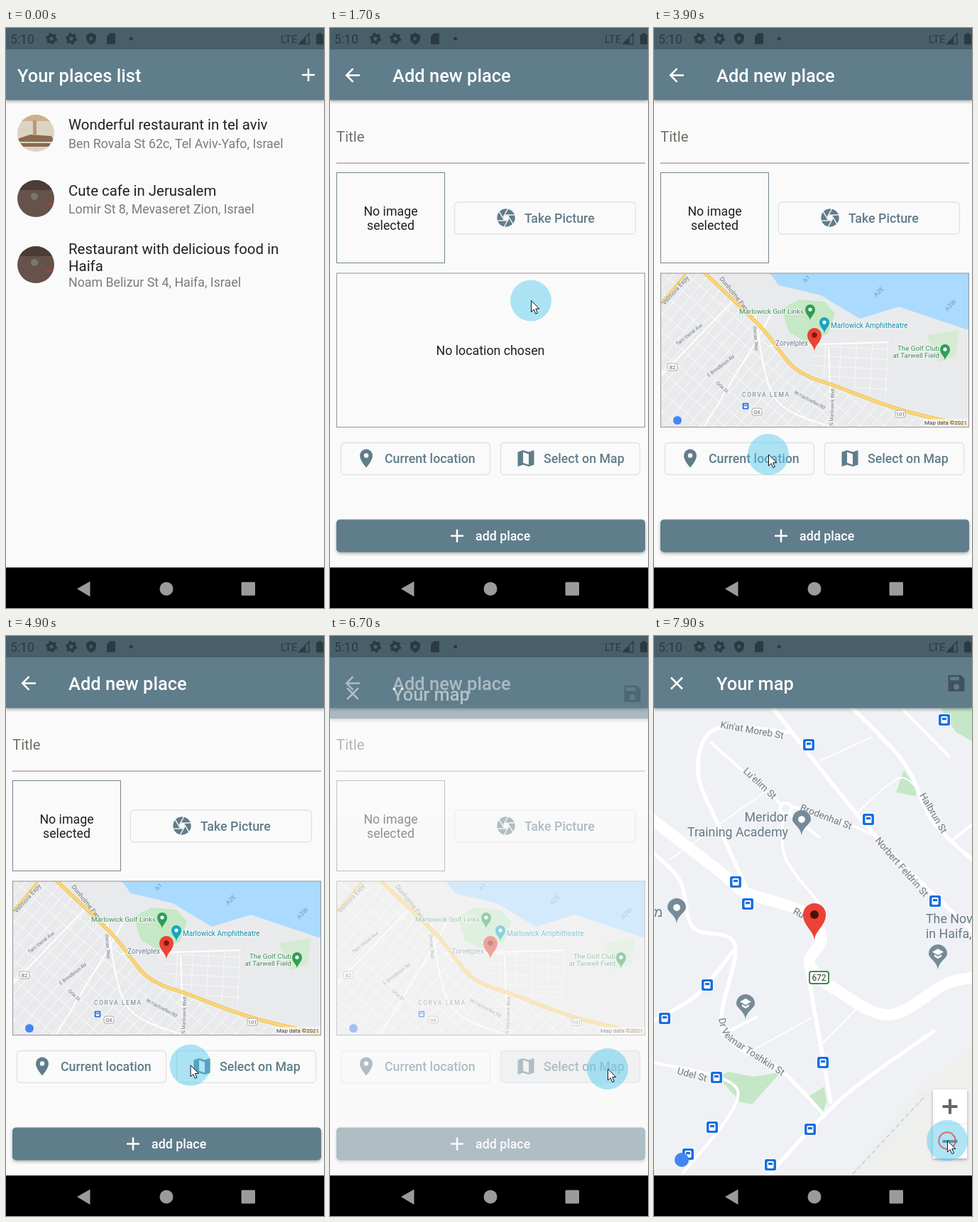
These frames come from a looping animation (448x816 px, 8000 ms). An HTML page:

```html
<!DOCTYPE html>
<html lang="en">
<head>
<meta charset="utf-8">
<title>Places app</title>
<style>
html, body { margin: 0; width: 100%; height: 100%; overflow: hidden; background: #000; }
svg { display: block; width: 448px; height: 816px; font-family: Roboto, "Noto Sans", sans-serif; }
.raised { filter: drop-shadow(0 2px 2px rgba(0,0,0,.3)); }
.road { fill: none; stroke-linecap: round; stroke-linejoin: round; }
.halo text { paint-order: stroke; stroke: #f2f4f7; stroke-width: 2.5px; stroke-linejoin: round; }
</style>
</head>
<body>
<svg id="stage" viewBox="0 0 448 816"></svg>
<script>
const SLATE = '#607d8b', PAPER = '#fafafa', DARK = '#2b3a42', INK = '#212121', GREY = '#74797d';
const BLUE = '#1a6fe0', RED = '#ea4335', STEEL = '#758b97', PAGE_H = 759;
const BAR = 25.46, HEAD = 20.4, BODY = 17.8;
const mid = 'text-anchor="middle"', end = 'text-anchor="end"', bold = 'font-weight="500"';

const text = (s, x, y, size, fill, more = '') =>
  `<text x="${x}" y="${y}" font-size="${size}" fill="${fill}" ${more}>${s}</text>`;
const tilted = (s, x, y, angle, size = 13.5, fill = GREY) =>
  text(s, x, y, size, fill, `transform="rotate(${angle} ${x} ${y})"`);
const rect = (x, y, w, h, fill, more = '') =>
  `<rect x="${x}" y="${y}" width="${w}" height="${h}" fill="${fill}" ${more}/>`;
const dot = (x, y, r, fill, more = '') => `<circle cx="${x}" cy="${y}" r="${r}" fill="${fill}" ${more}/>`;
const shape = (d, fill) => `<path d="${d}" fill="${fill}" fill-rule="evenodd"/>`;
const line = (d, color, width) => `<path d="${d}" fill="none" stroke="${color}" stroke-width="${width}"/>`;
const at = (x, y, body, k = 1) => `<g transform="translate(${x} ${y}) scale(${k})">${body}</g>`;
const frame = (x, y, w, h, color) => rect(x + .5, y + .5, w, h, 'none', `stroke="${color}"`);

// Icons are centred on 0,0
const plus = (r, color, w) => line(`M${-r} 0H${r}M0 ${-r}V${r}`, color, w);
const icons = {
  back: line('M10 0H-8M.5-9.3L-8.8 0 .5 9.3', '#fff', 2.5),
  close: line('M-8-8L8 8M8-8L-8 8', '#fff', 2.5),
  save: shape('M-11.5-11.5H6.500L11.5-6.500V11.5H-11.5z', '#40535d') + rect(-9, -9, 13, 5, SLATE) + dot(0, 5, 3.9, SLATE),
  place: shape('M-9-4a9 9 0 0 1 18 0C9 3 0 13 0 13S-9 3-9-4z', SLATE) + dot(0, -4, 3.2, PAPER),
  map: shape('M-11.5-9L-4-11.5 4-9 11.5-11.5V9L4 11.5-4 9-11.5 11.5zM4 9L-4 6.300V-9L4-6z', SLATE),
  camera: dot(0, 0, 12.7, SLATE) + dot(0, 0, 3.7, PAPER) +
    [0, 1, 2, 3, 4, 5].map(i => `<g transform="rotate(${i * 60})">${line('M-3.7-1.200L2.800-13', PAPER, 1.4)}</g>`).join(''),
  cap: shape('M0-7L-8-2.500 0 2 8-2.500zM-5 1V4L0 7 5 4V1L0 4z', '#fff'),
  gear: dot(0, 0, 4.6, 'none', `stroke="${DARK}" stroke-width="3.6"`) +
    dot(0, 0, 6.9, 'none', `stroke="${DARK}" stroke-width="2.6" pathLength="12" stroke-dasharray="1"`),
  shield: shape('M0-8.500L7-5V0Q6 6 0 8.500-6 6-7 0V-5zM-2-3V3L3 0z', DARK),
  card: shape('M-1.500-7.700H6V7.700H-6V-3z', DARK),
  bus: rect(-9, -9, 18, 18, '#fff', 'rx="3"') + rect(-8, -8, 16, 16, BLUE, 'rx="2.5"') +
    rect(-4.5, -5, 9, 10, '#fff', 'rx="1.5"') + rect(-3, -3, 6, 3.2, BLUE)
};

const pin = (x, y, r, fill, core, tip = 36) => at(x, y,
  shape(`M0 ${tip}C-1 ${tip - 14}-16 ${tip - 20}-16 0a16 16 0 0 1 32 0C16 ${tip - 20} 1 ${tip - 14} 0 ${tip}z`, fill) + dot(0, 0, 6, core), r / 16);

// Smooth road through "x,y x,y ..." points
function road(points, width, color = '#fff') {
  const p = points.split(' ').map(s => s.split(',').map(Number));
  let d = 'M' + p[0];
  for (let i = 1; i < p.length; i++) {
    const a = p[i - 2] || p[i - 1], b = p[i - 1], c = p[i], e = p[i + 1] || c;
    d += `C${b.map((v, k) => v + (c[k] - a[k]) / 6)} ${c.map((v, k) => v - (e[k] - b[k]) / 6)} ${c}`;
  }
  return `<path class="road" d="${d}" stroke="${color}" stroke-width="${width}"/>`;
}
const roads = (width, ...list) => list.map(p => road(p, width)).join('');

const appBar = (title, x) =>
  rect(0, 0, 448, 101.5, SLATE, 'class="raised"') + text(title, x, 76, BAR, '#fff', bold);

function button(name, label, x, y, w, iconX, textX) {
  return rect(x + .5, y + .5, w, 45, 'none', 'rx="5" stroke="#dfe2e4" stroke-width="1.3"') +
    rect(x, y, w + 1, 46, SLATE, `rx="5" opacity="0" id="${name}Glow"`) +
    at(iconX, y + 22.5, icons[name]) + text(label, textX, y + 29, BODY, SLATE, bold);
}

function listPage() {
  const row = (y, sub, ...lines) => lines.map((s, i) => text(s, 88, y + 24 * i, HEAD, INK)).join('') +
    text(sub, 88, y + 25.5 + 20.5 * (lines.length - 1), BODY, '#7b7b7b');
  const photo = (y, body) => `<g clip-path="url(#round)" transform="translate(42 ${y})">${body}</g>`;
  const terrace = rect(-26, -26, 52, 52, '#ddd3c3') + rect(-26, -26, 52, 9, '#cdb08b') + rect(-4, -18, 5, 20, '#b8997a') +
    shape('M-26 8L-8 2 22 4 26 12H-26z', '#8a6a51') + rect(-22, 14, 42, 5, '#8a6a51');
  const cafe = rect(-26, -26, 52, 52, '#65524a') + rect(-26, -26, 52, 14, '#4b3c36') + dot(-2, -3, 5, '#7c7470') +
    rect(14, 7, 8, 3, '#99463a');
  return rect(0, 0, 448, PAGE_H, PAPER) + photo(148, terrace) + photo(240, cafe) + photo(333, cafe) +
    row(143, 'Ben Rovala St 62c, Tel Aviv-Yafo, Israel', 'Wonderful restaurant in tel aviv') +
    row(235.5, 'Lomir St 8, Mevaseret Zion, Israel', 'Cute cafe in Jerusalem') +
    row(317.5, 'Noam Belizur St 4, Haifa, Israel', 'Restaurant with delicious food in', 'Haifa') +
    appBar('Your places list', 16) + dot(425, 66, 0, '#fff', 'id="ripple" opacity=".1"') + at(426, 66, plus(9, '#fff', 2.5));
}

function preview() {
  const green = '#3c8d50', freeway = '72,345 150,420 200,480 262,506 347,537 443,560';
  const badge = (s, x, y) => rect(x - 7, y - 5, 14, 10, '#fff', 'rx="3" stroke="#999" stroke-width=".8"') + text(s, x, y + 3, 7.5, '#555', mid);
  const small = (s, x, y, angle) => tilted(s, x, y, angle, 6.8);
  return '<g id="preview" clip-path="url(#box)">' + rect(9, 345, 435, 217, '#e9eaec') +
    shape('M9 345H72L150 420 200 480 262 506 420 562H9z', 'url(#blocks)') +
    shape('M222 440H330V520L262 500 222 484z', 'url(#grid)') +
    shape('M163 345H443V425L345 392 290 409 235 376 176 362z', '#aadaff') +
    shape('M180 395L205 382 240 385 255 402 245 430 215 442 190 428z', '#c5e8c5') +
    shape('M385 432L430 425 425 462 400 470z', '#d5ead3') +
    roads(2, '70,562 150,430 165,400', '142,400 170,520 250,562', '165,447 330,442', '250,562 246,450', '9,490 115,380') +
    road('9,388 45,345', 3, '#f8d16d') + road(freeway, 5, '#eebc52') + road(freeway, 3.4, '#fcd676') +
    tilted('Velmora Expy', 15, 390, -48, 8.5) + tilted('Dunholme Fwy', 92, 353, 51, 9) +
    small('Tarn Verrel Ave', 33, 447, -38) + small('E Brindleton Rd', 77, 491, -37) + small('Orla St', 87, 500, 42) +
    small('Dorian Way', 140, 420, 86) + small('W Harlowfen Rd', 197, 514, 28) + small('N Marlowick Blvd', 252, 560, -88) +
    '<g class="halo">' + text('Marlowick Golf Links', 211, 402, 9.8, green, end) +
    text('Marlowick Amphitheatre', 249, 422, 10, '#1591a5') + text('Zorvelplex', 217, 447, 10, '#76828e', end) +
    text('The Golf Club', 402, 454, 9.8, green, end) + text('at Tarwell Field', 402, 464, 9.8, green, end) +
    text('CORVA LEMA', 124, 519, 8.5, GREY, 'letter-spacing="1.6"') + '</g>' +
    ['A1', 'A2E', 'A3W'].map((s, i) => tilted(s, 213 + 100 * i, 359 + 20 * i, -45, 9, '#6b9dc0')).join('') +
    pin(220, 396, 7, '#2f9e55', '#fff') + pin(240, 414, 7, '#18a5c0', '#fff') + pin(410, 452, 7, '#2f9e55', '#fff') +
    badge('82', 26, 477) + badge('G6', 145, 540) + badge('101', 347, 543) + at(129, 532, icons.bus, .55) +
    pin(226, 432, 10, RED, '#7b1a12') +
    rect(381, 550, 62, 11, '#fff', 'opacity=".6"') + text('Map data ©2021', 441, 558, 8, '#333', end) +
    dot(33, 552, 6, '#4285f4') + '</g>';
}

function addPage() {
  return rect(0, 0, 448, PAGE_H, PAPER) + appBar('Add new place', 88) + at(32, 66.5, icons.back) +
    text('Title', 9, 160, HEAD, '#726e68') + rect(9, 189.5, 435, 1.2, '#949494') +
    frame(9, 203, 152, 127, '#73858f') +
    text('No image', 85.5, 263.5, BODY, INK, mid) + text('selected', 85.5, 284, BODY, INK, mid) +
    button('camera', 'Take Picture', 175, 244.5, 255, 248, 274) +
    text('No location chosen', 226, 459.5, BODY, INK, mid) + preview() + frame(9, 344.5, 434, 216.5, '#949494') +
    button('place', 'Current location', 15, 583, 210, 51, 77) +
    button('map', 'Select on Map', 240, 583, 196, 276, 301) +
    rect(9, 691.5, 435, 46, SLATE, 'rx="5" class="raised"') + at(179, 714.5, plus(9, '#fff', 2.5)) +
    text('add place', 205, 720.5, BODY, '#fff', bold);
}

function labels() {
  const poi = '#667985';
  const stops = '409,118 218,153 302,258 115,346 132,377 396,373 75,491 15,538 238,600 88,621 82,691 220,694 164,744 48,729';
  const marker = (x, y, core = '#fff') => pin(x, y, 13, STEEL, core, 28);
  const school = (x, y) => marker(x, y, STEEL) + at(x, y, icons.cap);
  return '<g id="labels"><g class="halo">' +
    tilted("Kin'at Moreb St", 93, 129, 10) + tilted("Lu'elim St", 125, 191, 43) + tilted('Brodenhal St', 205, 245, 21) +
    tilted('Norbert Feldrin St', 311, 288, 49) + tilted('Halbrun St', 374, 224, 60) + tilted('Udel St', 32, 616, 15) +
    tilted('Rud', 195, 390, 28) +
    `<text font-size="13.5" fill="${GREY}"><textPath href="#bend">Dr Velmar Toshkin St</textPath></text>` +
    text('Meridor', 189, 261, BODY, poi, end) + text('Training Academy', 189, 282, BODY, poi, end) +
    text('The Nov', 383, 403.5, BODY, poi) + text('in Haifa,', 383, 425, BODY, poi) + text('מ', 0, 395, BODY, poi) + '</g>' +
    stops.split(' ').map(s => at(...s.split(','), icons.bus)).join('') +
    marker(208, 258) + marker(32, 382) + school(400, 447) + school(129, 517) +
    rect(219, 472, 27, 17, '#fff', 'rx="3" stroke="#3c8d4b" stroke-width="2"') + text('672', 232.5, 485, 12, '#333', mid) + '</g>';
}

function mapPage() {
  const green = '#c5e7c7', land = '#eff1f5';
  return rect(0, 0, 448, PAGE_H, PAPER) + '<g id="map">' + rect(0, 101, 448, PAGE_H - 101, land) +
    shape('M275 759L375 635 448 578V759z', '#efefed') +
    shape('M92 622L104 613 140 620 178 614 138 659 121 655z', green) + shape('M214 650L240 634 243 655 236 676z', green) +
    shape('M341 220L352 189 371 215 368 225z', green) + shape('M404 102H448V148L425 135z', green) +
    `<g stroke-dasharray="6 4">${line('M280 757L383 646', '#a9d8f7', 1.6)}</g>` +
    roads(2, '305,143 235,175', '288,247 345,200 375,220', '22,315 158,218', '130,588 222,537', '233,577 286,524') +
    roads(4, '80,150 178,236', '195,240 250,255 313,281', '190,250 233,283', '182,250 185,312 232,375', '97,560 145,536',
      '-4,599 118,640 40,757', '352,105 416,170', '418,289 452,262') +
    roads(5.5, '131,356 90,265 62,190 87,131 195,136', '165,98 311,280 452,418', '276,98 352,178 392,260 452,318',
      '-4,302 37,345 55,410 114,435 97,555 180,612 240,675', '-4,543 60,505 114,440',
      '160,760 265,650 394,556', '214,460 249,655') +
    roads(16, '-8,254 95,333 130,361 210,388 236,425 219,462 260,500 333,533 410,490 455,480') +
    dot(185.5, 243, 8, land, 'stroke="#fff" stroke-width="4.5"') +
    `<g id="gaps">${rect(0, 102, 87, 80, 'url(#tile)') + rect(415, 102, 33, 80, 'url(#tile)')}</g>` +
    labels() + pin(226, 392, 16, RED, '#4a110d') + dot(39, 737, 10, '#4285f4') +
    rect(393, 638, 48, 97, '#fff', 'rx="2" class="raised"') + rect(393, 686, 48, 1, '#e4e4e4') +
    at(417, 662, plus(10.5, '#666', 4)) + rect(406.5, 709, 21, 4, '#666') + '</g>' +
    appBar('Your map', 88) + at(32, 66.5, icons.close) + at(426, 66.5, icons.save);
}

function system() {
  const tray = ['gear', 'gear', 'shield', 'card'].map((name, i) => at(64 + 28 * i, 15, icons[name])).join('');
  return rect(0, 0, 448, 30, '#000', 'opacity=".25"') + text('5:10', 6, 21.5, 17.5, DARK) + tray + dot(176.5, 15, 2.5, DARK) +
    text('LTE', 387, 20.5, 15, DARK) + line('M412.5 22.5H427V8z', DARK, 1.4) + shape('M412 23H422V13z', DARK) +
    rect(437, 9, 10, 14, DARK, 'rx="1"') + rect(440, 7, 4, 3, DARK) +
    rect(0, PAGE_H, 448, 57, '#000') + shape('M100 789L118.5 778.5V800z', '#9b9b9b') +
    dot(226, 789, 9.5, '#9b9b9b') + rect(331.5, 779.5, 19.5, 19, '#9b9b9b', 'rx="1.5"');
}

const pattern = (id, w, h, bg, stroke, turn, width) =>
  `<pattern id="${id}" width="${w}" height="${h}" patternUnits="userSpaceOnUse" patternTransform="rotate(${turn})">` +
  rect(0, 0, w, h, bg) + line(`M0 0H${w}M0 0V${h}`, stroke, width) + '</pattern>';

document.getElementById('stage').innerHTML = '<defs>' + pattern('blocks', 13, 21, '#e9eaec', '#f8f8f9', 41, 2) +
  pattern('grid', 22, 14, '#e9eaec', '#f8f8f9', 3, 2) + pattern('tile', 16, 16, '#dad5d4', '#cfc9c9', 0, 2) +
  `<clipPath id="round">${dot(0, 0, 26, '#000')}</clipPath><clipPath id="box">${rect(9, 345, 435, 217, '#000')}</clipPath>` +
  '<path id="bend" d="M91 538Q94 562 108 572L200 632"/></defs>' +
  `<g>${listPage()}</g><g id="add">${addPage()}</g><g id="view">${mapPage()}</g>${system()}` +
  `<g id="cursor">${dot(0, 0, 29, '#54c9ee', 'opacity=".48"')}` +
  dot(0, 0, 0, 'none', `id="ring" stroke="${RED}" stroke-width="2"`) +
  '<path d="M.5 0V16l3.7-3.4 2.6 6 2.6-1.1-2.6-5.9h5z" fill="#fff" stroke="#111"/></g>';

const $ = id => document.getElementById(id);
const set = (id, attrs) => { for (const k in attrs) $(id).setAttribute(k, attrs[k]); };
const show = (id, on) => set(id, { visibility: on ? 'inherit' : 'hidden' });
const ramp = (t, from, to) => Math.max(0, Math.min(1, (t - from) / (to - from)));

function bezier(x1, y1, x2, y2, x) {
  const curve = (a, b, u) => 3 * a * u * (1 - u) ** 2 + 3 * b * u * u * (1 - u) + u ** 3;
  let lo = 0, hi = 1;
  for (let i = 0; i < 24; i++) {
    const u = (lo + hi) / 2;
    if (curve(x1, x2, u) < x) lo = u; else hi = u;
  }
  return curve(y1, y2, lo);
}

// Page route: slides up a quarter of the page while fading in
function enter(id, t, start) {
  const p = ramp(t, start, start + 300);
  show(id, p > 0);
  set(id, {
    opacity: bezier(.42, 0, 1, 1, p),
    transform: `translate(0 ${p < 1 ? PAGE_H / 4 * (1 - bezier(.4, 0, .2, 1, p)) : 0})`
  });
}

// Cursor legs: start, end, destination
const legs = [[300, 900, 424, 66], [1200, 1300, 405, 167], [1300, 2100, 161, 600], [4600, 5300, 391, 609], [7200, 7600, 413, 710]];
const clicks = [1000, 2800, 6300, 7700];

function cursorAt(t) {
  let x = 198, y = 329;
  for (const [from, to, u, v] of legs) {
    const p = ramp(t, from, to);
    x += (u - x) * p;
    y += (v - y) * p;
  }
  return [x, y];
}

function draw(t) {
  enter('add', t, 1168);
  enter('view', t, 6499);
  show('preview', t >= 3900);
  show('map', t >= 6900);
  show('gaps', t < 7000);
  show('labels', t >= 7200);
  set('ripple', { r: 46 * ramp(t, 1000, 1300) });
  set('placeGlow', { opacity: .12 * ramp(t, 2800, 3000) * ramp(t, 3600, 3300) });
  set('mapGlow', { opacity: .13 * ramp(t, 6300, 6500) });

  show('cursor', t >= 100);
  set('cursor', { transform: `translate(${cursorAt(t)})` });
  const age = t - clicks.findLast(c => c <= t);
  show('ring', age < 300);
  if (age < 300) set('ring', { r: 2.5 + .046 * age, fill: age ? 'none' : RED, opacity: 1 - (age / 400) ** 2 });
}

function tick() {
  draw(Math.floor(performance.now() % 8000 / 100) * 100);
  requestAnimationFrame(tick);
}
tick();
</script>
</body>
</html>
```
